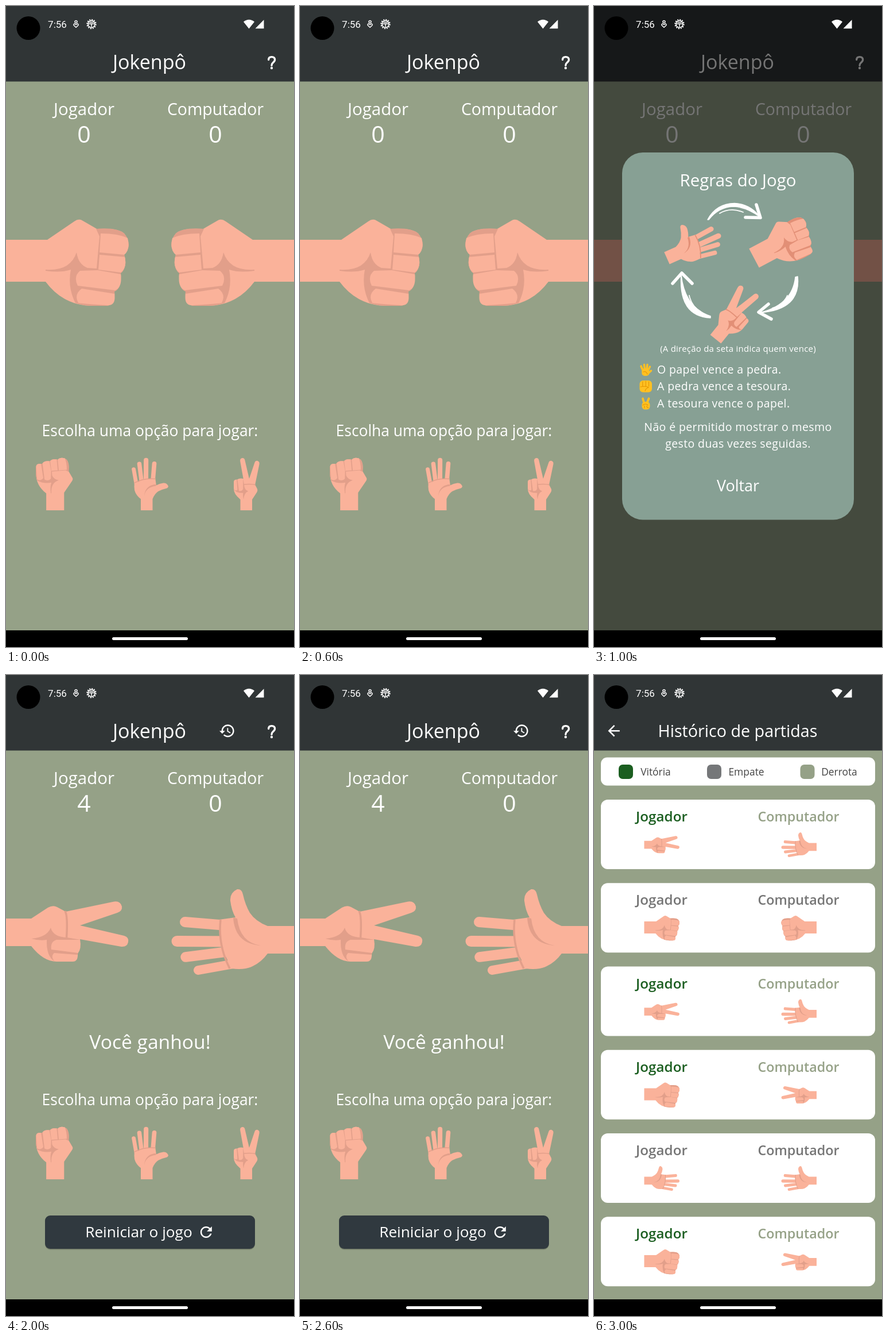
An HTML page for the animation above (4 s loop, 502 by 1116 pixels).

```html
<!DOCTYPE html>
<html lang="pt-BR">
<head>
<meta charset="utf-8">
<title>Jokenpô</title>
<style>
  html, body { margin: 0; width: 100%; height: 100%; overflow: hidden; background: #000; }
  svg { display: block; width: 100vw; height: 100vh; }
  text { font-family: "Open Sans", "Noto Sans", sans-serif; fill: #fff; }
  #stage { --skin: #fab29a; --shade: #e29f8a; }
  .skin { fill: var(--skin); }
  .shade { fill: var(--shade); }
  .finger { fill: none; stroke: var(--skin); stroke-linecap: round; }
  .crease { fill: none; stroke: var(--shade); stroke-width: 3.5; }
  .line { fill: none; stroke: #fff; stroke-linecap: round; stroke-linejoin: round; }
  .rules { --shade: #e28f76; }
</style>
</head>
<body>
<svg id="stage" viewBox="0 0 502 1116" preserveAspectRatio="none">
  <defs>
    <g id="rock">
      <path class="skin" d="M0 407H72L119 375Q127 369 134 374L160 389Q193 385 206 396Q216 408 213 421Q210 430 206 433Q209 442 208 450Q206 461 200 465Q201 476 198 486Q196 494 189 497Q190 508 187 515Q183 522 174 522H152Q100 522 69 480H0Z"/>
      <path class="shade" d="M157 388Q193 385 206 396Q216 408 213 421Q210 430 206 433Q209 442 208 450Q206 461 200 465Q201 476 198 486Q196 494 189 497Q190 508 187 515Q183 522 174 522H152Q135 522 121 517Q107 490 113 459Q95 465 69 461V459Q112 462 123 429Q126 450 142 456L158 457L163 401Z"/>
      <path class="skin" d="M165 396Q195 396 212 404Q217 425 206 433L163 429ZM163 433L207 437Q211 456 200 464L161 459ZM129 461L160 460L200 467Q203 490 190 495L125 487Q117 471 129 461ZM132 492L189 501Q192 521 178 521Q140 519 126 517Q118 502 132 492Z"/>
    </g>
    <g id="paper">
      <path class="finger" stroke-width="18" d="M190 430L118 436"/>
      <path class="finger" stroke-width="19" d="M204 463.5L110 464"/>
      <path class="finger" stroke-width="17.5" d="M189 491L110 481"/>
      <path class="finger" stroke-width="16" d="M167 514L100 502"/>
      <path class="skin" d="M0 437H46Q67 429 77 414Q85 400 89 382Q91 372 99 373Q112 379 111 393Q109 410 102 422L131 426L126 475L109 511Q86 514 72 507Q57 500 46 485H0Z"/>
      <path class="crease" d="M128 426Q133 470 112 511"/>
      <path class="shade" d="M106 422Q103 468 58 471Q94 466 99 424Z"/>
    </g>
    <g id="scissors">
      <path class="skin" d="M0 424H44L73 405Q82 400 89 404L104 412L186 395Q199 392 202 403Q203 411 194 414L129 436L206 454Q215 457 213 465Q211 474 201 473L129 460Q132 477 125 485Q126 499 116 499H90Q66 500 44 472H0Z"/>
      <path class="shade" d="M44 459Q71 457 78 440Q82 456 106 457L130 461H88Q77 464 79 478L126 484L124 487L84 484Q77 490 85 499Q70 490 71 461Q58 463 44 459Z"/>
      <path class="crease" stroke-width="3" d="M103 411Q108 420 105.5 458"/>
    </g>
  </defs>
</svg>
<script>
const stage = document.getElementById('stage');
const GREEN = '#1b5e20', SAGE = '#95a187', GREY = '#757575', DARK = '#303536';

const rect = (x, y, w, h, fill, r = 0) =>
  `<rect x="${x}" y="${y}" width="${w}" height="${h}" rx="${r}" fill="${fill}"/>`;

const text = (s, x, y, size, style = '', anchor = 'middle') =>
  `<text x="${x}" y="${y}" font-size="${size}" text-anchor="${anchor}" style="${style}">${s}</text>`;

const icon = (d, x, y, k) =>
  `<path fill="#fff" transform="translate(${x} ${y}) scale(${k})" d="${d}"/>`;

const line = (d, w) => `<path class="line" stroke-width="${w}" d="${d}"/>`;

const use = (id, transform) => `<use href="#${id}" transform="${transform}"/>`;

// dir 1 points right from the left edge, -1 points left from the right edge
const sideHand = (id, x, y, k, dir) =>
  use(id, `translate(${x} ${y}) scale(${dir * k} ${k}) translate(0 -447.5)`);

const upHand = (id, x) =>
  use(id, `matrix(0 -.427 -.427 0 ${x + 447.5 * .427} 878)`);

const turnedHand = (id, x, y, angle, k, wrist) =>
  use(id, `translate(${x} ${y}) rotate(${angle}) scale(${k}) translate(0 ${-wrist})`);

const ICONS = {
  history: 'M13 3c-4.97 0-9 4.03-9 9H1l3.89 3.89.07.14L9 12H6c0-3.87 3.13-7 7-7s7 3.13 7 7-3.13 7-7 7c-1.93 0-3.68-.79-4.94-2.06l-1.42 1.42C8.27 19.99 10.51 21 13 21c4.97 0 9-4.03 9-9s-4.03-9-9-9zm-1 5v5l4.28 2.54.72-1.21-3.5-2.08V8H12z',
  refresh: 'M17.65 6.35C16.2 4.9 14.21 4 12 4c-4.42 0-7.99 3.58-7.99 8s3.57 8 7.99 8c3.73 0 6.84-2.55 7.73-6h-2.08c-.82 2.33-3.04 4-5.65 4-3.31 0-6-2.69-6-6s2.69-6 6-6c1.66 0 3.14.69 4.22 1.78L13 11h7V4l-2.35 2.35z',
  back: 'M20 11H7.83l5.59-5.59L12 4l-8 8 8 8 1.41-1.41L7.83 13H20v-2z'
};

const backdrop = rect(0, 0, 502, 1087, SAGE) + rect(0, 0, 502, 131.5, DARK);

function board(score, left, right) {
  return backdrop +
    text('Jokenpô', 250, 109.5, 34) +
    line('M457.7 93.5Q457.9 88.6 463 88.6Q468.6 88.6 468.6 93.6Q468.6 96.2 465.5 98.6Q463 100.8 463 103.5', 3.3) +
    '<circle cx="463" cy="108" r="2.2" fill="#fff"/>' +
    text('Jogador', 136, 190, 29.4) + text('Computador', 365, 190, 28.4) +
    text(score, 136, 238, 41) + text(0, 365, 238, 41) +
    sideHand(left, 0, 447.5, 1, 1) + sideHand(right, 502, 447.5, 1, -1) +
    text('Escolha uma opção para jogar:', 251, 749, 26.4) +
    upHand('rock', 84) + upHand('paper', 251) + upHand('scissors', 419);
}

function emojis() {
  const fingers = (d, w) =>
    `<path d="${d}" fill="none" stroke="#ffc022" stroke-width="${w}" stroke-linecap="round"/>`;
  const folds = d =>
    `<path d="${d}" fill="none" stroke="#e59600" stroke-width="1.1" stroke-linecap="round"/>`;
  return fingers('M85 634L82 627M88.5 632L87.5 624.5M92 632L93 624.5M94.5 634L97.5 628M94 640L99.5 635', 3.4) +
    rect(83.3, 631, 13, 13, '#ffc022', 5) + folds('M86 637Q91 635 93 641') +
    rect(79.5, 652, 21.5, 20.5, '#ffc022', 6) +
    folds('M84.8 654V662M90.2 653V662M95.5 654V662M81 663Q91 661 95 664Q90 666 89 670') +
    fingers('M87.5 692L85 683.5M92 692L95.5 683.5', 3.7) +
    rect(83.5, 689, 14, 13.5, '#ffc022', 5.5) +
    folds('M85 695Q90 691 94 695M88 700V696M92 696Q92 700 95 699');
}

function curvedArrow(body, head, inner) {
  return `<path d="${body}" fill="#fff" stroke="#fff" stroke-width="1.5" stroke-linejoin="round"/>` +
    line(head, 5.5) + line(inner, 1.8);
}

function rules() {
  const spaced = 'letter-spacing:.38px';
  const item = (s, y) => text(s, 110, y, 19.5, spaced, 'start');
  return rect(0, 0, 502, 1087, 'rgba(0,0,0,.54)') +
    rect(49, 255, 404, 639.5, '#87a094', 36) +
    text('Regras do Jogo', 251, 313.5, 29.4) +
    curvedArrow('M198 372Q213 344 245 343.5Q272 345 289 367Q266 350 243 349Q217 350 200 372Z',
      'M283 346L290 368.5L264 368', 'M219 361Q238 350 260 359') +
    curvedArrow('M355 471Q361 529 289 534Q346 520 351 472Z',
      'M304 519L287 533L309 545', 'M337 504Q329 522 311 526') +
    curvedArrow('M203 543Q147 540 152 468Q158 525 203 540Z',
      'M137 483L153 465L171 483', 'M166 504Q170 523 186 532') +
    '<g class="rules">' +
    turnedHand('paper', 127, 439, -24, .48, 461) +
    turnedHand('rock', 279, 439, -28, .51, 443.5) +
    turnedHand('scissors', 212, 580, -51, .5, 448) + '</g>' +
    text('(A direção da seta indica quem vence)', 251, 602, 15, 'letter-spacing:.23px') +
    emojis() +
    item('O papel vence a pedra.', 640) +
    item('A pedra vence a tesoura.', 669) +
    item('A tesoura vence o papel.', 698.5) +
    text('Não é permitido mostrar o mesmo', 251, 740, 19.5, spaced) +
    text('gesto duas vezes seguidas.', 251, 769, 19.5, spaced) +
    text('Voltar', 251, 845, 27);
}

const result =
  icon(ICONS.history, 370.8, 82.6, 1.22) +
  text('Você ganhou!', 251, 651, 33.6) +
  rect(68, 942.5, 366, 58, 'rgba(0,0,0,.22)', 9) +
  rect(68, 941, 366, 58, '#30393f', 9) +
  text('Reiniciar o jogo', 231.5, 979, 26.2) +
  icon(ICONS.refresh, 333.8, 955, 1.25);

function history() {
  const legend = [['Vitória', 43, 107.5, GREEN], ['Empate', 197, 265.5, '#757779'], ['Derrota', 359.5, 427.5, SAGE]];
  const games = [
    ['scissors', 'paper'], ['rock', 'rock'], ['scissors', 'paper'],
    ['rock', 'scissors'], ['paper', 'paper'], ['rock', 'scissors']
  ];
  const cards = games.map(([mine, theirs], i) => {
    const y = 217 + i * 145.25, draw = mine === theirs;
    const name = (s, x, size, color) =>
      text(s, x, y + 38, size, `font-weight:600;fill:${draw ? GREY : color}`);
    return rect(12, y, 478, 121, '#fff', 12) +
      name('Jogador', 118, 24.2, GREEN) + name('Computador', 356.5, 23.3, SAGE) +
      sideHand(mine, 87.5, y + 78.5, .288, 1) +
      sideHand(theirs, 388, y + 78.5, .288, -1);
  });
  return backdrop + icon(ICONS.back, 19.4, 82, 1.27) +
    text('Histórico de partidas', 250.5, 107.5, 28.7) +
    rect(12, 143.5, 478, 49, '#fff', 11) +
    legend.map(([s, x, tx, color]) =>
      rect(x, 156, 25, 25, color, 7) + text(s, tx, 174.5, 17.4, 'fill:#444')).join('') +
    cards.join('');
}

function systemBars() {
  return '<circle cx="39" cy="38.5" r="20.5"/>' +
    text('7:56', 89.5, 38, 17, 'font-family:Roboto,sans-serif') +
    '<circle class="line" cx="122" cy="27.5" r="2" stroke-width="1.5"/>' +
    line('M122 37.3L118 33.5Q117.6 30.5 120 31L122 32.6L124 31Q126.4 30.5 126 33.5Z', 1.5) +
    '<circle cx="149" cy="31.5" r="7.6" fill="none" stroke="#fff" stroke-width="2.2" stroke-dasharray="2 1.98"/>' +
    '<circle class="line" cx="149" cy="31.5" r="6" stroke-width="1.6"/>' +
    line('M144 31H154M149 32V36M146 28.5H152', 1.5) +
    '<path fill="#fff" d="M423.5 39.5L414 27.5Q423.5 20 433 27.5ZM434.5 39.3L449.5 24V39.3Z"/>' +
    rect(0, 1087, 502, 29, '#000') + rect(185, 1099, 132, 5, '#fff', 2.5);
}

const start = board(0, 'rock', 'rock');
const scenes = [start, start + rules(), board(4, 'scissors', 'paper') + result, history()];
stage.insertAdjacentHTML('beforeend',
  scenes.map(s => `<g class="scene">${s}</g>`).join('') + systemBars());

const groups = [...stage.querySelectorAll('.scene')];
function show(now) {
  const current = Math.floor(now / 1000) % groups.length;
  groups.forEach((g, i) => { g.style.display = i === current ? '' : 'none'; });
}
const began = performance.now();
function tick() {
  show(performance.now() - began);
  requestAnimationFrame(tick);
}
tick();
</script>
</body>
</html>
```
